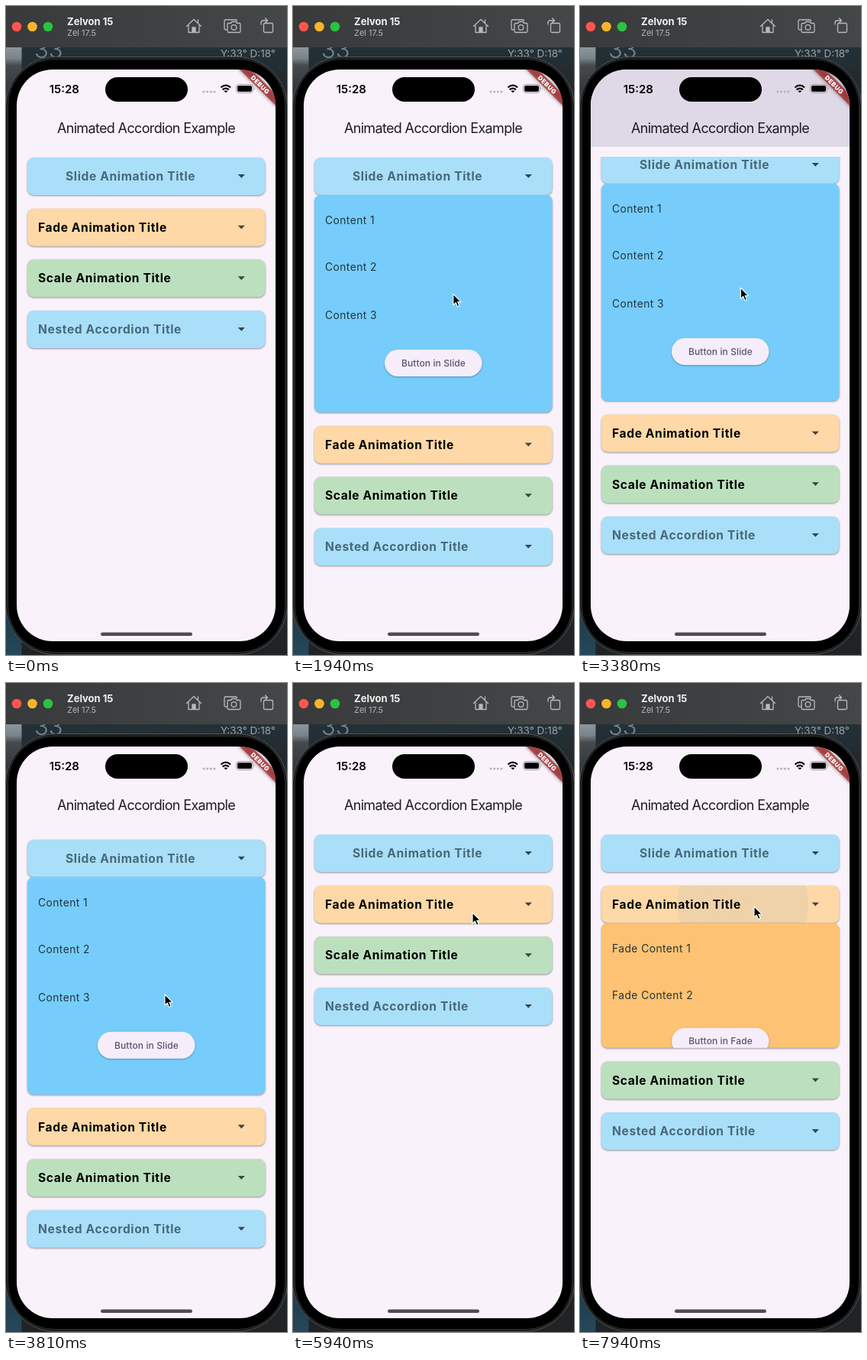
Write an HTML page that moves like this. It is 368 px wide and 848 px high and loops after 8 s.

```html
<!DOCTYPE html>
<html lang="en">
<head>
<meta charset="utf-8">
<title>Animated Accordion Example</title>
<style>
html, body { margin: 0; width: 100%; height: 100%; overflow: hidden; background: #17191b; }
svg { display: block; width: 100%; height: 100%; }
text { font-family: Inter, Roboto, sans-serif; white-space: pre; }
.title { font-size: 15.6px; font-weight: 700; letter-spacing: .62px; }
.item { font-size: 13.8px; letter-spacing: .45px; fill: #24323b; }
.btn { font-size: 12px; font-weight: 500; letter-spacing: .1px; fill: #585370; }
.card { filter: drop-shadow(0 1.9px 1.1px rgba(40, 40, 50, .5)); }
.pill { filter: drop-shadow(0 1px 1px rgba(0, 0, 0, .3)); }
.blur { filter: blur(2.4px); }
.icon { fill: none; stroke: #b7b9ba; stroke-width: 1.3; stroke-linejoin: round; stroke-linecap: round; }
</style>
</head>
<body>
<svg id="stage" viewBox="0 0 368 848" preserveAspectRatio="none">
  <defs>
    <linearGradient id="bar"><stop offset="0" stop-color="#383a3b"/><stop offset="1" stop-color="#444748"/></linearGradient>
    <linearGradient id="sea" x2="0" y2="1">
      <stop offset="0" stop-color="#8d969b"/><stop offset=".018" stop-color="#79848b"/>
      <stop offset=".03" stop-color="#474a4c"/><stop offset=".09" stop-color="#252e34"/>
      <stop offset=".15" stop-color="#1a1c1e"/><stop offset=".85" stop-color="#1a1f23"/>
      <stop offset=".93" stop-color="#1d3a4a"/><stop offset="1" stop-color="#25485a"/>
    </linearGradient>
    <linearGradient id="desk" x2="0" y2="1">
      <stop offset="0" stop-color="#263943"/><stop offset=".12" stop-color="#22292d"/><stop offset="1" stop-color="#202325"/>
    </linearGradient>
    <clipPath id="screen"><rect x="14" y="83" width="339" height="747" rx="47"/></clipPath>
    <clipPath id="view"><rect x="26" y="197" width="316" height="640"/></clipPath>
    <clipPath id="head"><rect width="311.5" height="49" rx="8.5"/></clipPath>
  </defs>

  <rect width="368" height="848" fill="url(#desk)"/>
  <rect y="54" width="20.5" height="794" fill="url(#sea)"/>
  <text x="37" y="68" font-size="31" font-weight="300" fill="#74868f">33</text>
  <text x="353" y="67" font-size="13.5" text-anchor="end" fill="#98a5ac">Y:33° D:18°</text>

  <rect width="368" height="54" fill="url(#bar)"/>
  <circle cx="14" cy="27" r="6.3" fill="#fe564e"/>
  <circle cx="34.5" cy="27" r="6.3" fill="#f7b52c"/>
  <circle cx="55" cy="27" r="6.3" fill="#2bc33f"/>
  <text x="80" y="25" font-size="13" font-weight="700" fill="#f1f2f2">Zelvon 15</text>
  <text x="80" y="39" font-size="11" fill="#b4b6b7">Zel 17.5</text>
  <g class="icon">
    <path d="M236.5 26.5 246 17.5 255.5 26.5M239 25v9.5h14V25M251.5 22v-4"/>
    <path d="M244 34v-6h4v6Z" fill="#b7b9ba"/>
    <path d="M289 31h-1.500q-1.500 0-1.500-1.500V19.500q0-1.500 1.500-1.500H301q1.500 0 1.500 1.500"/>
    <path d="M291.500 22.500h3l1.500-2h5l1.500 2h3q1.500 0 1.500 1.500v9q0 1.500-1.500 1.500h-14q-1.500 0-1.500-1.500v-9q0-1.500 1.500-1.500Z"/>
    <circle cx="298.5" cy="28" r="3.3"/>
    <rect x="337.500" y="22.500" width="12" height="12" rx="1.500"/>
    <path d="M334 24v-2q0-3 3-3h5M339.500 16l3 3-3 3"/>
  </g>

  <rect x="-.5" y="66.5" width="369" height="781" rx="66" fill="#1a1b1c" stroke="#505457"/>
  <rect x="2.500" y="69.500" width="363" height="775" rx="61" fill="#000" stroke="#353738" stroke-width=".8"/>

  <g clip-path="url(#screen)">
    <rect x="14" y="83" width="339" height="747" fill="#f9f2fb"/>
    <rect id="tint" x="14" y="83" width="339" height="101" fill="#dfd9e7"/>
    <text x="183.5" y="166" font-size="18" letter-spacing="-.65" text-anchor="middle" fill="#1d1b20">Animated Accordion Example</text>
    <g clip-path="url(#view)"><g id="list"></g></g>
    <rect x="130" y="93" width="108" height="32" rx="16"/>
    <text x="76.300" y="114" font-size="15" font-weight="600" text-anchor="middle">15:28</text>
    <g fill="#b9b4bc"><circle cx="259" cy="112" r="1.6"/><circle cx="263.7" cy="112" r="1.6"/><circle cx="268.3" cy="112" r="1.6"/><circle cx="273" cy="112" r="1.6"/></g>
    <g fill="none" stroke="#000" stroke-width="2.1">
      <path d="M281.5 106.5q6.3-5.6 12.6 0M283.7 109.4q4.1-3.6 8.2 0"/>
      <path d="M286 111h3.6l-1.8 2Z" fill="#000" stroke-width="1"/>
    </g>
    <rect x="301.5" y="102.5" width="22" height="11" rx="3.6" fill="none" stroke="#9c98a0"/>
    <rect x="303" y="104" width="19" height="8" rx="2.3"/>
    <path d="M325 106.3q1.800 1.700 0 3.400Z" fill="#9c98a0"/>
    <path class="blur" d="M296 73 363 140V125L311 73Z" opacity=".5"/>
    <path d="M306 83 353 130V115L321 83Z" fill="#b71c1c" fill-opacity=".63"/>
    <text transform="translate(333 103) rotate(45)" y="3" font-size="8.2" font-weight="900" letter-spacing=".5" text-anchor="middle" fill="#fff">DEBUG</text>
    <rect x="124" y="818.5" width="120" height="4.4" rx="2.2" fill="#504a53"/>
  </g>
  <path id="cursor" d="M0 0V14.200L3.300 11.200 5.600 16.400 8.100 15.300 5.800 10.200H10.200Z" stroke="#fff" stroke-width="1.1" stroke-linejoin="round"/>
</svg>
<script>
const LOOP = 8000, WIDTH = 311.5, HEAD = 49, PITCH = 66.65;
const $ = id => document.getElementById(id);
const clamp = v => Math.max(0, Math.min(1, v));
const smooth = v => v * v * (3 - 2 * v);

function add(parent, tag, attrs, text) {
  const el = document.createElementNS('http://www.w3.org/2000/svg', tag);
  for (const k in attrs) el.setAttribute(k, attrs[k]);
  if (text) el.textContent = text;
  return parent.appendChild(el);
}

const soft = '#48687a';
const cards = [
  { title: 'Slide Animation Title', x: 50, color: '#a9dff9', ink: soft, ripple: 'rgba(190,170,170,.3)',
    body: '#76cdfb', full: 284, items: ['Content 1', 'Content 2', 'Content 3'], button: 'Button in Slide' },
  { title: 'Fade Animation Title', x: 14, color: '#fed8a6', ink: '#000', ripple: 'rgba(190,190,170,.25)',
    body: '#fdc273', full: 219, items: ['Fade Content 1', 'Fade Content 2'], button: 'Button in Fade' },
  { title: 'Scale Animation Title', x: 14, color: '#bce0bd', ink: '#000' },
  { title: 'Nested Accordion Title', x: 14, color: '#a9dff9', ink: soft }
];

function sparkles(parent) {
  const g = add(parent, 'g', { fill: '#fff', opacity: .3 });
  let seed = 7;
  const rnd = () => (seed = seed * 16807 % 2147483647) / 2147483647;
  for (let i = 0; i < 110; i++) {
    add(g, 'circle', { cx: 101 + rnd() * 168, cy: rnd() * HEAD, r: .6 });
  }
}

function buildPanel(g, card, i) {
  card.panel = add(g, 'g', {});
  card.back = add(card.panel, 'rect', { y: HEAD, width: WIDTH, rx: 8, fill: card.body, class: 'card' });
  const clip = add(g, 'clipPath', { id: 'clip' + i });
  card.clip = add(clip, 'rect', { y: HEAD, width: WIDTH });
  const rows = add(card.panel, 'g', { 'clip-path': `url(#clip${i})` });
  const ys = [87.2, 147.9, 211];
  card.rows = card.items.map((s, n) => add(rows, 'text', { x: 14, y: ys[n], class: 'item' }, s));
  const b = add(rows, 'g', {});
  const top = card.full - 33;
  add(b, 'rect', { x: 92, y: top, width: 127.5, height: 35, rx: 17.5, fill: '#f5eefa', class: 'pill' });
  add(b, 'text', { x: 156, y: top + 21.8, 'text-anchor': 'middle', class: 'btn' }, card.button);
  card.rows.push(b);
}

function build(card, i) {
  const g = card.el = add($('list'), 'g', {});
  add(g, 'rect', { width: WIDTH, height: HEAD, rx: 8.5, fill: card.color, class: 'card' });
  if (card.ripple) {
    card.wave = add(g, 'g', { 'clip-path': 'url(#head)' });
    card.disc = add(card.wave, 'circle', { cy: 25, fill: card.ripple });
    if (i === 1) sparkles(card.wave);
  }
  add(g, 'text', { x: card.x, y: 30.2, fill: card.ink, class: 'title' }, card.title);
  add(g, 'path', { d: 'M275.7 22h9.2l-4.600 4.800Z', fill: '#1d2328', opacity: .82 });
  if (card.body) buildPanel(g, card, i);
}
cards.forEach(build);

// time, x, y
const path = [
  [560, 150, 8], [1000, 190, 214], [1200, 192.2, 225], [1520, 192.2, 225],
  [2050, 212, 395], [2350, 212, 395], [2880, 212.5, 346], [3050, 212, 342],
  [3810, 208, 407], [4000, 208, 407], [4700, 239.3, 220], [5200, 239.3, 220],
  [5750, 235, 300], [6100, 235, 300], [7690, 230, 292], [7750, 228, 292]
];
function cursorAt(t) {
  let i = path.findIndex(p => p[0] > t);
  if (i < 0) return path[path.length - 1].slice(1);
  if (i === 0) return path[0].slice(1);
  const a = path[i - 1], b = path[i], k = smooth((t - a[0]) / (b[0] - a[0]));
  return [a[1] + (b[1] - a[1]) * k, a[2] + (b[2] - a[2]) * k];
}

const OPEN = 1262, CLOSE = 4882, FADE = 7940, SPAN = 500;
const DRAG = 2350, DROP = 4000;
const drag = t => .56 * (cursorAt(t)[1] - 395);
function scrollAt(t) {
  if (t < DRAG) return 0;
  if (t < DROP) return drag(t);
  return drag(DROP) * (1 - smooth(clamp((t - DROP) / 350)));
}

const starts = [.129, .225, .315, .4];
const slideIn = (v, n) => WIDTH * (1 - clamp((v - starts[n]) * 2.5));

function setPanel(card, v) {
  const h = Math.max(0, v * card.full);
  card.panel.style.display = h > .1 ? '' : 'none';
  card.back.setAttribute('height', h);
  card.clip.setAttribute('height', h);
  return h;
}

function setRipple(card, x, r, alpha) {
  card.wave.style.display = alpha > 0 ? '' : 'none';
  card.disc.setAttribute('cx', x);
  card.disc.setAttribute('r', r);
  card.wave.setAttribute('opacity', alpha);
}

function draw(t) {
  const [x, y] = cursorAt(t), shift = scrollAt(t);
  $('cursor').style.display = t < path[0][0] ? 'none' : '';
  $('cursor').setAttribute('transform', `translate(${x} ${y})`);
  $('tint').setAttribute('opacity', clamp(-shift / 10));

  const [slide, fade] = cards;
  const v = clamp((t - OPEN) / SPAN) - clamp((t - CLOSE) / SPAN);
  const grow = [setPanel(slide, v), setPanel(fade, t < FADE ? 0 : .745)];
  slide.rows.forEach((r, n) => r.setAttribute('transform', `translate(${slideIn(v, n)} 0)`));

  const tap = t < CLOSE ? OPEN : CLOSE, age = Math.max(0, t - tap);
  const alpha = clamp(age / 60) * (1 - clamp((age - 210) / 250));
  setRipple(slide, tap === OPEN ? 165 : 212, 30 + age * 2.5, alpha);
  setRipple(fade, 185, 86, t < FADE ? 0 : 1);

  let top = 198 + shift;
  cards.forEach((c, i) => {
    c.el.setAttribute('transform', `translate(28 ${top})`);
    top += PITCH + (grow[i] || 0);
  });
}

const begin = performance.now();
function tick() {
  draw((performance.now() - begin) % LOOP);
  requestAnimationFrame(tick);
}
tick();
</script>
</body>
</html>
```
